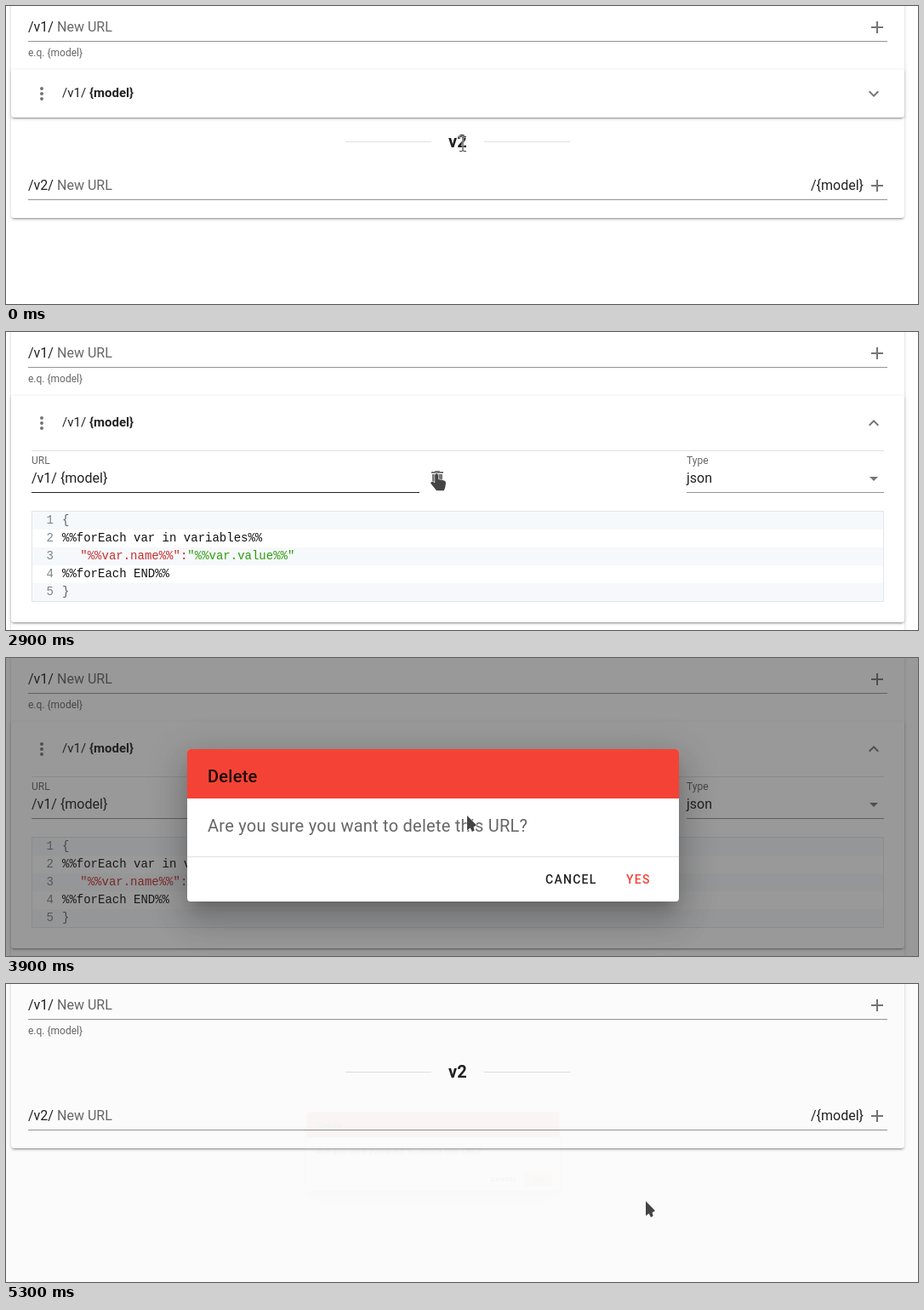
These frames come from a looping animation (1072 by 350 pixels, 6.4 s). An HTML page:

```html
<!DOCTYPE html>
<html lang="en">
<head>
<meta charset="utf-8">
<title>Delete a URL</title>
<style>
  html, body { margin: 0; width: 100%; height: 100%; overflow: hidden; background: #fff; }
  #stage { position: relative; width: 1072px; height: 350px; overflow: hidden; }
  #stage div, svg { position: absolute; }
  svg { left: 0; top: 0; width: 1072px; height: 350px; overflow: visible; }
  text { font: 16px Roboto, sans-serif; fill: rgba(0,0,0,.87); white-space: pre; }
  .soft { fill: rgba(0,0,0,.6); }
  .small { font-size: 12px; fill: rgba(0,0,0,.6); }
  .head { font-size: 15px; }
  .bold { font-weight: 700; }
  .title { font-size: 20px; letter-spacing: .0125em; }
  .btn { font-size: 14px; font-weight: 500; letter-spacing: .0893em; }
  .code text { font: 14px "Liberation Mono", monospace; fill: #111; }
  .code .num { fill: #7c858b; text-anchor: end; }
  .code .punct { fill: #5f6364; }
  .red { fill: #c92c2c; }
  .green { fill: #2f9c0a; }
  .icon { fill: rgba(0,0,0,.54); }
  .line { fill: rgba(0,0,0,.42); }
  .rule { fill: rgba(0,0,0,.12); }
  #card, #panel {
    left: 6px; width: 1050px; background: #fff; border-radius: 0 0 4px 4px;
    box-shadow: 0 3px 1px -2px rgba(0,0,0,.2), 0 2px 2px rgba(0,0,0,.14), 0 1px 5px rgba(0,0,0,.12);
  }
  #card { top: -10px; }
  #panel { top: 75px; overflow: hidden; }
  #panel svg { left: -6px; top: -75px; }
  #scrim { inset: 0; background: #212121; }
  #dialog {
    left: 213px; top: 107px; width: 578px; height: 179px; background: #fff; border-radius: 4px; overflow: hidden;
    box-shadow: 0 11px 15px -7px rgba(0,0,0,.2), 0 24px 38px 3px rgba(0,0,0,.14), 0 9px 46px 8px rgba(0,0,0,.12);
  }
  #dialog svg { left: -213px; top: -107px; }
  #cursor path { fill: #444; stroke: rgba(255,255,255,.75); stroke-width: 1.4; paint-order: stroke; }
</style>
</head>
<body>
<div id="stage">
  <div id="card"></div>
  <svg>
    <defs>
      <path id="plus" class="icon" d="M19 13h-6v6h-2v-6H5v-2h6V5h2v6h6z"/>
      <clipPath id="yesBox"><rect x="711" y="242" width="64" height="36" rx="4"/></clipPath>
    </defs>
    <text x="26" y="30">/v1/</text>
    <text class="soft" x="60" y="30">New URL</text>
    <use href="#plus" x="1012" y="13"/>
    <rect class="line" x="26" y="41" width="1010" height="1"/>
    <text class="small" x="26" y="59">e.q. {model}</text>
    <g id="below">
      <rect class="rule" x="399" y="159" width="101" height="1"/>
      <rect class="rule" x="562" y="159" width="101" height="1"/>
      <text class="title bold" x="520" y="166">v2</text>
      <text x="26" y="216">/v2/</text>
      <text class="soft" x="60" y="216">New URL</text>
      <text x="1008" y="216" text-anchor="end">/{model}</text>
      <use href="#plus" x="1012" y="199"/>
      <rect class="line" x="26" y="227" width="1010" height="1"/>
    </g>
  </svg>

  <div id="panel"><svg>
    <g id="header">
      <g class="icon"><circle cx="42" cy="97" r="2"/><circle cx="42" cy="103" r="2"/><circle cx="42" cy="109" r="2"/></g>
      <text class="head" x="66" y="107">/v1/</text>
      <text class="head bold" x="98" y="107">{model}</text>
      <g id="chevron"><path class="icon" transform="translate(1008 91)" d="M7.41 8.58L12 13.17l4.59-4.59L18 10l-6 6-6-6z"/></g>
    </g>
    <g id="content">
      <rect class="rule" x="30" y="139" width="1002" height="1"/>
      <text class="small" x="30" y="155">URL</text>
      <text x="30" y="177">/v1/ {model}</text>
      <rect id="underline" x="30" y="188" width="456" height="1"/>
      <path class="icon" transform="translate(495 160)" d="M19 4h-3.5l-1-1h-5l-1 1H5v2h14M6 19a2 2 0 0 0 2 2h8a2 2 0 0 0 2-2V7H6z"/>
      <text class="small" x="800" y="155">Type</text>
      <text x="800" y="177">json</text>
      <path class="icon" transform="translate(1008 160)" d="M7 10l5 5 5-5z"/>
      <rect class="line" x="800" y="188" width="232" height="1"/>
      <g class="code">
        <rect x="30.5" y="210.5" width="1001" height="106" fill="#fff" stroke="#dfe6ea"/>
        <g id="rows"></g>
        <text class="punct" x="66" y="225">{</text>
        <text x="66" y="246">%%forEach var in variables%%</text>
        <text x="87.3" y="267"><tspan class="red">"%%var.name%%":</tspan><tspan class="green">"%%var.value%%"</tspan></text>
        <text x="66" y="288">%%forEach END%%</text>
        <text class="punct" x="66" y="309">}</text>
      </g>
    </g>
  </svg></div>

  <div id="scrim"></div>
  <div id="dialog"><svg>
    <rect x="213" y="107" width="578" height="58" fill="#f44336"/>
    <text class="title" x="237" y="146" font-weight="500" style="font-weight:500">Delete</text>
    <text class="title soft" x="237" y="204">Are you sure you want to delete this URL?</text>
    <rect class="rule" x="213" y="233" width="578" height="1"/>
    <text class="btn" x="634" y="265">CANCEL</text>
    <text class="btn" x="729" y="265" style="fill:#f44336">YES</text>
    <g id="press" clip-path="url(#yesBox)" fill="#f44336">
      <rect x="711" y="242" width="64" height="36" opacity=".12"/>
      <circle id="ripple" cy="259" opacity=".25"/>
    </g>
  </svg></div>
  <svg id="cursor"><path/></svg>
</div>

<script>
const $ = id => document.getElementById(id);
const clamp = v => Math.min(1, Math.max(0, v));
const LOOP = 6400, STEP = 100;

$('rows').innerHTML = [1, 2, 3, 4, 5].map(n => {
  const y = 190 + n * 21;
  return `<rect x="31" y="${y}" width="1000" height="21" fill="${n % 2 ? '#f6f9fb' : '#fff'}"/>
          <text class="num" x="56" y="${y + 14}">${n}</text>`;
}).join('');

// cubic-bezier(.25, .8, x2, 1)
function ease(x, x2) {
  if (x <= 0 || x >= 1) return clamp(x);
  const curve = (s, a, b) => 3 * s * (1 - s) ** 2 * a + 3 * s * s * (1 - s) * b + s ** 3;
  let lo = 0, hi = 1;
  for (let i = 0; i < 30; i++) {
    const mid = (lo + hi) / 2;
    if (curve(mid, .25, x2) < x) lo = mid; else hi = mid;
  }
  return curve(lo, .8, 1);
}
const swing = (t, start, x2) => ease((t - start) / 300, x2);

const shapes = {
  arrow: 'M0 0V17.3L3.7 14.6L6 19L8.6 17.6L7.6 13.6L11 11.2z',
  hand: 'M-1.8 10.5V1.2a1.9 1.9 0 0 1 3.8 0V6l7 1.6q2 .6 2 2.6l-.8 5.2-1.4 3.8H0L-6.8 10.8q.4-2.8 2.8-1.8z',
  beam: 'M-4-9H-1L0-8L1-9H4V-8H1L.6-7V7L1 8H4V9H1L0 8L-1 9H-4V8H-1L-.6 7V-7L-1-8H-4z'
};

// start, end, then from, bend and to points
const moves = [
  [100, 700, 537, 162, 440, 198, 275, 126],
  [1600, 2300, 275, 126, 420, 190, 509, 185],
  [2700, 2900, 509, 185, 508, 176, 506, 167],
  [3800, 4500, 507, 167, 630, 232, 754, 258],
  [4500, 4600, 754, 258, 753, 256, 752, 255]
];

function pointer(t) {
  const [a, b, x0, y0, x1, y1, x2, y2] = moves.findLast(m => m[0] <= t) || moves[0];
  const u = clamp((t - a) / (b - a)), v = 1 - u;
  const mix = (p, q, r) => v * v * p + 2 * u * v * q + u * u * r;
  return [mix(x0, x1, x2), mix(y0, y1, y2)];
}

function draw(t) {
  const open = swing(t, 1095, .5);
  const deleted = t >= 5200;
  const height = deleted ? 0 : 56 + 210 * open;
  $('panel').style.display = deleted ? 'none' : '';
  $('panel').style.height = height + 'px';
  $('card').style.height = 203 + height + 'px';
  $('below').setAttribute('transform', `translate(0 ${height - 56})`);
  $('header').setAttribute('transform', `translate(0 ${4 * open})`);
  $('chevron').setAttribute('transform', `rotate(${-180 * open} 1020 103)`);
  $('content').setAttribute('transform', `translate(0 ${8 * open - 8})`);

  const closing = t >= 5000;
  const shade = closing ? 1 - swing(t, 5085, .5) : swing(t, 3298, .5);
  const show = closing ? 1 - swing(t, 5114, .25) : swing(t, 3298, .25);
  $('scrim').style.opacity = .46 * shade;
  $('dialog').style.opacity = show;
  $('dialog').style.transform = show < 1 ? `scale(${.5 + show / 2})` : 'none';

  const grow = clamp((t - 5100) / 100);
  $('press').style.display = t >= 5100 ? '' : 'none';
  $('ripple').setAttribute('cx', 747 - 4 * grow);
  $('ripple').setAttribute('r', 23 + 14 * grow);

  const [x, y] = pointer(t);
  const modal = t >= 3300;
  const inField = !modal && t > 1600 && y > 144;
  const hand = !modal && (inField ? x > 487 : y < 131 + 8 * open);
  const shape = hand ? 'hand' : inField || t < 200 ? 'beam' : 'arrow';
  $('underline').style.fill = `rgba(0,0,0,${inField ? .87 : .42})`;
  const path = $('cursor').firstChild;
  path.setAttribute('d', shapes[shape]);
  path.setAttribute('transform', `translate(${Math.round(x)} ${Math.round(y)})`);
}

function tick() {
  draw(Math.floor(performance.now() % LOOP / STEP) * STEP);
  requestAnimationFrame(tick);
}
tick();
</script>
</body>
</html>
```
